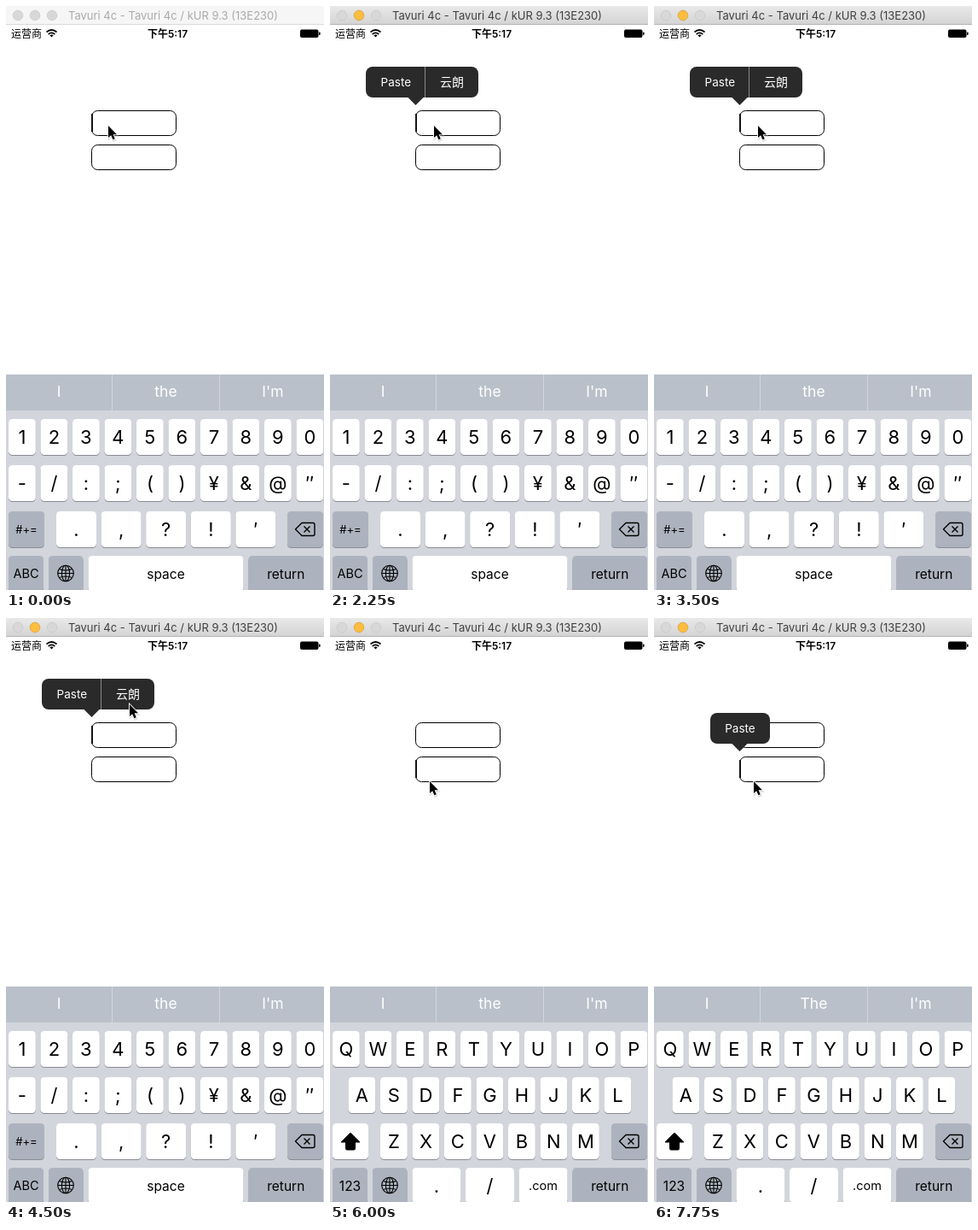
An HTML page that plays this animation: 373 by 683 pixels, repeating every 8000 ms.

```html
<!DOCTYPE html>
<html>
<head>
<meta charset="utf-8">
<style>
html, body { margin: 0; width: 100%; height: 100%; overflow: hidden; background: #fff; }
svg { display: block; font-family: Inter, "Noto Sans CJK SC", "Noto Sans CJK", sans-serif; }
text { text-anchor: middle; }
</style>
</head>
<body>
<svg id="stage" width="373" height="683" viewBox="0 0 373 683"></svg>
<script>
const LOOP = 8000;
const GRAY = '#adb3be';

const text = (x, y, size, str, extra = '') =>
  `<text x="${x}" y="${y}" font-size="${size}" ${extra}>${str}</text>`;
const rect = (x, y, w, h, extra) =>
  `<rect x="${x}" y="${y}" width="${w}" height="${h}" ${extra}/>`;

const key = (x, y, w, label = '', size = 22, fill = '#fff') =>
  rect(x, y + 1, w, 42, 'rx="4.5" fill="#898c92"') +
  rect(x, y, w, 42, `rx="4.5" fill="${fill}"`) +
  text(x + w / 2, y + 21 + size * 0.365, size, label);
const row = (x, y, labels, step = 37.5, w = 31.8) =>
  [...labels].map((c, i) => key(x + i * step, y, w, c)).join('');

const symbols =
  row(3, 483, '1234567890') +
  row(3, 537, '-/:;()¥&@″').replace('>&<', '>&amp;<') +
  key(3, 591, 42, '#+=', 13, GRAY) +
  row(59, 591, '.,?!′', 52.6, 47) +
  key(3, 643, 41, 'ABC', 14.5, GRAY) +
  key(96.5, 643, 182, 'space', 15.5);

const letters =
  row(3, 483, 'QWERTYUIOP') +
  row(21.5, 537, 'ASDFGHJKL') +
  key(3, 591, 42) +
  '<path d="M24 602L35 613H29.5V620.5Q29.5 622 28 622H20Q18.5 622 18.5 620.5V613H13Z" stroke="#000" stroke-linejoin="round"/>' +
  row(59, 591, 'ZXCVBNM') +
  key(3, 643, 41, '123', 15.5, GRAY) +
  row(96.5, 643, './', 62.5, 57) +
  key(221.5, 643, 57, '.com', 14.5);

const shared =
  key(330, 591, 42, '', 22, GRAY) +
  key(50, 643, 40.5, '', 22, GRAY) +
  key(284.5, 643, 87.5, 'return', 15.5, GRAY) +
  `<g fill="none" stroke="#000" stroke-width="1.4" stroke-linejoin="round">
    <path d="M347 604.5H360Q362 604.5 362 606.5V617.5Q362 619.5 360 619.5H347L339.5 612Z"/>
    <path d="M349.5 608.5L356.5 615.5M356.5 608.5L349.5 615.5"/>
    <g stroke-width="1.1"><circle cx="70" cy="663.5" r="9.3"/><ellipse cx="70" cy="663.5" rx="4.6" ry="9.3"/>
    <path d="M70 654.2V672.8M60.7 663.5H79.3M62.5 658.5Q70 661.5 77.5 658.5M62.5 668.5Q70 665.5 77.5 668.5"/></g>
  </g>`;

const menu = (id, x, y, w, content) =>
  `<g id="${id}"><g fill="#2a2a2a">${rect(x, y, w, 36, 'rx="8"')}
    <path d="M91 ${y + 35.5}H110L100.5 ${y + 45}Z"/></g>
    <g fill="#fff">${content}</g></g>`;

const field = y =>
  rect(100.5, y, 99, 29, 'rx="7" fill="#fff" stroke="#000"');

stage.innerHTML = `
  <defs><linearGradient id="bar" x2="0" y2="1">
    <stop stop-color="#e9e9e9"/><stop offset="1" stop-color="#d3d3d3"/>
  </linearGradient></defs>
  ${rect(0, 0, 373, 22, 'id="titleBar"')}
  ${rect(0, 21, 373, 1, 'id="titleLine"')}
  <g stroke-width=".7">${[14, 34, 54].map(x =>
    `<circle cx="${x}" cy="11" r="5.8" fill="#d8d8d8" stroke="#c6c6c6"/>`).join('')}
    <circle id="minimize" cx="34" cy="11" r="5.8" fill="#fdbd3f" stroke="#dfa032"/></g>
  ${text(196, 16, 13, 'Tavuri 4c - Tavuri 4c / kUR 9.3 (13E230)',
    'id="title" textLength-free=""'.split(' ')[0])}

  ${text(24, 36.5, 12, '运营商')}
  <g fill="none" stroke="#000" stroke-width="1.7">
    <path d="M47.5 30.5Q53.5 25.5 59.5 30.5M49.7 33Q53.5 29.8 57.3 33"/>
    <path d="M51.3 34.2Q53.5 32.6 55.7 34.2L53.5 36.5Z" fill="#000" stroke="none"/>
  </g>
  ${text(189.5, 36.5, 12, '下午5:17', 'font-weight="600"')}
  ${rect(345, 27.5, 21.5, 9.5, 'rx="2"')}
  ${rect(367, 30.5, 1.6, 3.5, 'rx=".8"')}

  ${field(122.5)}${field(162.5)}
  ${rect(100, 0, 2, 21, 'id="caret" fill="#151515"')}

  ${rect(0, 431, 373, 42, 'fill="#b9c0c9"')}
  ${rect(0, 473, 373, 210, 'fill="#d2d5db"')}
  ${rect(124, 431, 1, 42, 'fill="#d2d6dc"')}
  ${rect(250, 431, 1, 42, 'fill="#d2d6dc"')}
  <g fill="#fff">
    ${text(62, 457, 17.5, 'I')}
    ${text(187.5, 457, 17.5, 'the', 'id="suggestion"')}
    ${text(313, 457, 17.5, "I'm")}
  </g>
  <g id="symbols">${symbols}</g>
  <g id="letters">${letters}</g>
  ${shared}

  ${menu('wideMenu', 42, 71, 132,
    rect(111, 71, 1, 36, 'fill="#8a8a8a"') + text(77.3, 94, 13.5, 'Paste') + text(143, 94, 14, '云朗'))}
  ${menu('smallMenu', 66, 111, 70, text(101, 134, 13.5, 'Paste'))}
  <g id="pointer">
    <path d="M0 0V14L3.2 11.2L5.4 16.2L7.8 15.2L5.6 10.3H10Z" transform="translate(.6 1.4)" fill="none" stroke="#000" stroke-width="2" opacity=".14"/>
    <path d="M0 0V14L3.2 11.2L5.4 16.2L7.8 15.2L5.6 10.3H10Z" stroke="#fff" stroke-width="1.8" paint-order="stroke"/>
  </g>`;

const $ = id => document.getElementById(id);
const set = (id, attrs) => {
  for (const name in attrs) $(id).setAttribute(name, attrs[name]);
};

// Each step is [start time, value...]; the latest one started holds.
const pointerSteps = [[0, 120, 140], [250, 122, 141], [500, 122, 140], [4250, 134, 118],
  [4500, 145, 101], [5000, 121, 159], [5250, 117, 171], [5500, 117, 191]];
const caretSteps = [[0, 1], [250, 0], [750, 1], [2000, 0], [2250, 1], [4000, 0],
  [4500, 1], [5000, 0], [5250, 1], [7000, 0], [7250, 1]];
const wideSteps = [[0, 0], [1250, 1], [2500, 0.45], [2750, 0], [3500, 1], [6000, 0]];
const smallSteps = [[0, 0], [7500, 0.65], [7750, 1]];
const at = (steps, t) => steps.findLast(s => s[0] <= t).slice(1);

function draw(t) {
  const active = t >= 1250, typing = t >= 6000;
  set('titleBar', { fill: active ? 'url(#bar)' : '#f6f6f6' });
  set('titleLine', { fill: active ? '#b4b4b4' : '#dadada' });
  set('title', { fill: active ? '#404040' : '#aaa' });
  set('minimize', { opacity: +active });
  set('caret', { y: typing ? 166 : 126, opacity: at(caretSteps, t)[0] });
  set('symbols', { opacity: +!typing });
  set('letters', { opacity: +typing });
  set('wideMenu', { opacity: at(wideSteps, t)[0] });
  set('smallMenu', { opacity: at(smallSteps, t)[0] });
  set('pointer', { transform: `translate(${at(pointerSteps, t)})` });
  $('suggestion').textContent = t >= 6250 ? 'The' : 'the';
}

const start = performance.now();
function tick() {
  draw((performance.now() - start) % LOOP);
  requestAnimationFrame(tick);
}
tick();
</script>
</body>
</html>
```
